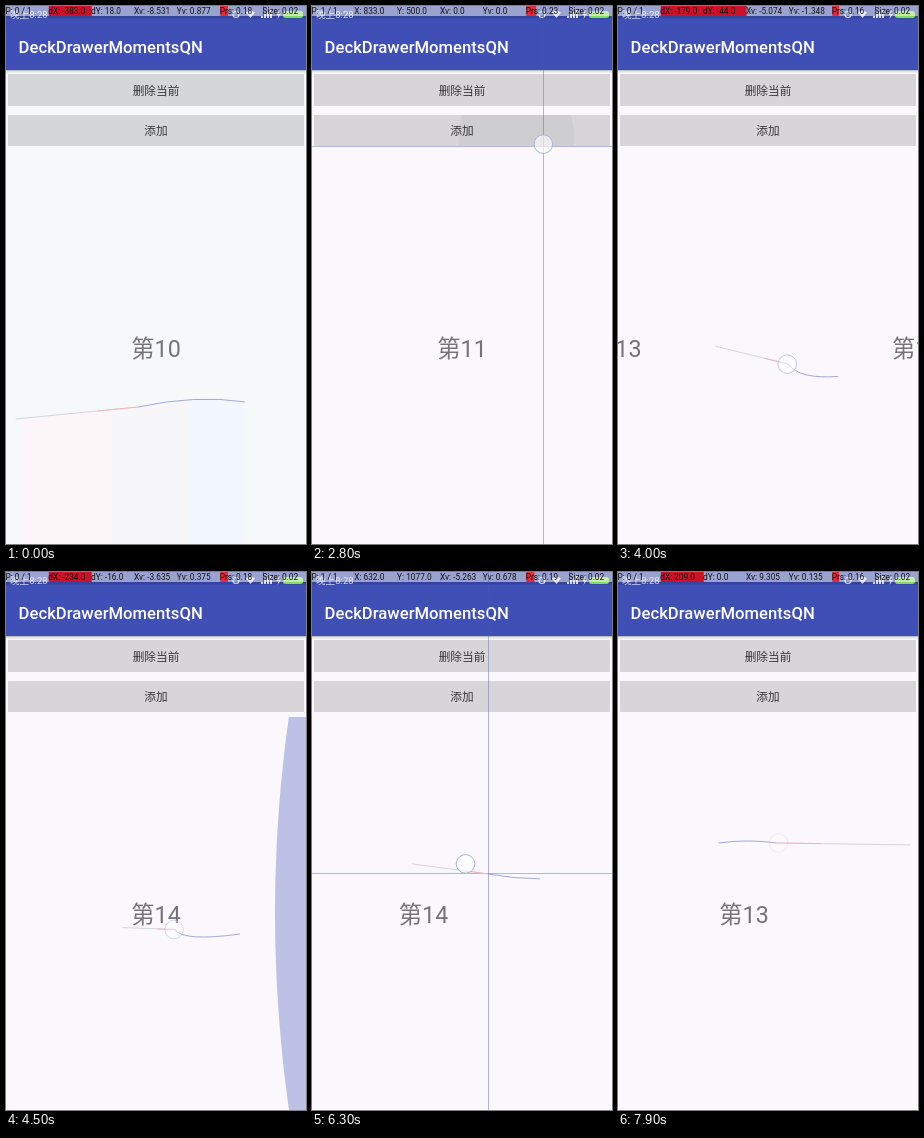
These frames come from a looping animation (300 by 538 pixels, 8000 ms). An HTML page:

```html
<!DOCTYPE html>
<html lang="zh">
<head>
<meta charset="utf-8">
<title>Pager demo</title>
<style>
html, body { margin: 0; width: 300px; height: 538px; overflow: hidden; background: #faf8fc; }
svg { display: block; }
text { font-family: Roboto, "Noto Sans CJK SC", "Noto Sans CJK", sans-serif; }
.label { font-size: 11.67px; fill: #363638; text-anchor: middle; }
.page { font-size: 23.3px; fill: #747376; text-anchor: middle; }
.cell { font-size: 8.3px; fill: #111; }
.line { fill: none; stroke-width: .9; }
#buttons { filter: drop-shadow(0 .7px .7px rgba(0, 0, 0, .22)); }
</style>
</head>
<body>
<svg width="300" height="538" viewBox="0 0 300 538">
  <defs>
    <clipPath id="body"><rect y="145" width="300" height="393"/></clipPath>
    <clipPath id="addBox"><rect x="2" y="109" width="296" height="31" rx="1.5"/></clipPath>
  </defs>
  <rect id="bg" width="300" height="538"/>
  <g id="wash">
    <path d="M16 413L105 403V538H16Z" fill="#fcf6f8"/>
    <path d="M105 403L183 394V538H105Z" fill="#f7f6f9"/>
    <path d="M183 394L239 396V538H183Z" fill="#f3f8fe"/>
  </g>

  <rect width="300" height="64" fill="#3f4fb5"/>
  <rect width="300" height="12.5" fill="#35449f"/>
  <rect y="64" width="300" height="1" fill="#bdbdc6"/>
  <rect y="65" width="300" height="1.5" fill="#e4e3e9"/>
  <text x="12.6" y="47" font-size="16.67" font-weight="500" fill="#fff">DeckDrawerMomentsQN</text>

  <g id="buttons">
    <rect x="2" y="68" width="296" height="32" rx="1.5"/>
    <rect x="2" y="109" width="296" height="31" rx="1.5"/>
  </g>
  <g clip-path="url(#addBox)"><circle id="ripple" fill="#cecdd0"/></g>
  <text class="label" x="150" y="88.7">删除当前</text>
  <text class="label" x="150" y="129.2">添加</text>

  <text class="page" id="pageA" y="350.7"></text>
  <text class="page" id="pageB" y="350.7"></text>
  <g clip-path="url(#body)"><circle id="glow" cy="341" r="1393" fill="#3f51b5" fill-opacity=".33"/></g>

  <g fill="#fff" opacity=".8">
    <text x="4" y="12" font-size="9.6">晚上8:28</text>
    <circle cx="230" cy="8.5" r="3" fill="none" stroke="#fff" stroke-width="1.2"/>
    <path d="M240 6.5Q244.500 3 249 6.500L244.500 12Z"/>
    <path d="M255 12v-2h2v2zM258 12v-4h2v4zM261 12v-6h2v6zM264 12v-8h2v8z"/>
    <path d="M273.500 4L270.500 9H272.500L271.500 13L275 8H273Z"/>
  </g>
  <rect x="277" y="5" width="20" height="7" rx="2.5" fill="#84dc5c"/>
  <g id="cells"></g>

  <path class="line" id="cross" stroke="#3f5bb4" stroke-opacity=".45"/>
  <path class="line" id="speed" stroke="#d3d0d6"/>
  <path class="line" id="trail" stroke="#9a9cda"/>
  <path class="line" id="guess" stroke="#f0b4bc"/>
  <circle id="touch" r="9.3" fill="#fff" fill-opacity=".62" stroke="#aab5d4" stroke-width="1"/>
</svg>
<script>
const LOOP = 8000, STEP = 100, SETTLE = 350;
const SX = 300 / 1080, SY = 538 / 1920, CELL = 300 / 7;
const $ = id => document.getElementById(id);
const clamp = (v, lo = 0, hi = 1) => Math.min(hi, Math.max(lo, v));
const set = (id, attrs) => {
  for (const k in attrs) $(id).setAttribute(k, attrs[k]);
};
const show = (id, on) => set(id, { visibility: on ? 'visible' : 'hidden' });

// Touch positions are in device pixels; bend and vy are in stage pixels.
const swipe = (up, turn, x, y, dx, dy, xv, yv, vy, bend, prs = 0.18) =>
  ({ down: up - 150, up, turn, x, y, dx, dy, xv, yv, vy, bend, prs });
const tap = (down, up, x, y, prs) =>
  ({ down, up, turn: 0, x, y, dx: 0, dy: 0, xv: 0, yv: 0, vy: 0, prs, tap: true });

const touches = [
  swipe(-500, 0, 860, 1413, -383, 18, -8.531, 0.877, 12, [4, -10]),
  swipe(1030, 1, 850, 1380, -240, -12, -5.42, -0.412, -6, [-4, 5]),
  tap(1540, 1690, 763, 455, 0.18),
  tap(1950, 2080, 790, 470, 0.21),
  tap(2350, 2470, 815, 488, 0.2),
  tap(2730, 2850, 833, 500, 0.23),
  swipe(3040, 1, 806, 1290, -210, -30, -4.812, -0.906, -13, [-10, 6]),
  swipe(3500, 1, 798, 1310, -195, -36, -4.655, -1.104, -15, [-12, 8], 0.16),
  swipe(3962, 1, 792, 1322, -179, -44, -5.074, -1.348, -18, [-14, 9], 0.16),
  swipe(4420, 0, 842, 1292, -234, -16, -3.635, 0.375, -2, [-24, 10]),
  tap(5880, 5970, 800, 470, 0.19),
  swipe(6330, 1, 821, 1095, -236, -22, -5.263, 0.678, -10, [0, 3], 0.19),
  swipe(7230, -1, 350, 980, 225, 4, 8.74, 0.182, 3, [0, -4]),
  swipe(7768, -1, 362, 967, 209, 0, 9.305, 0.135, 2, [0, -4], 0.16)
];

const cells = Array.from({ length: 7 }, (_, i) => {
  const add = (tag, attrs) => {
    const el = document.createElementNS('http://www.w3.org/2000/svg', tag);
    for (const k in attrs) el.setAttribute(k, attrs[k]);
    return $('cells').appendChild(el);
  };
  const box = { x: i * CELL, y: 0, height: 10 };
  return {
    back: add('rect', { ...box, width: CELL, fill: '#fff', 'fill-opacity': .5 }),
    level: add('rect', { ...box, width: 0, fill: '#f00', 'fill-opacity': .75 }),
    text: add('text', { class: 'cell', x: i * CELL - .6, y: 8 })
  };
});

function pagePos(t) {
  let pos = 10;
  for (const s of touches) {
    if (!s.turn || t < s.down) continue;
    const pulled = clamp((t - s.down) / (s.up - s.down)) * Math.abs(s.dx) * SX;
    const drag = Math.max(0, pulled - 14) / 300;
    const ease = 1 - (1 - clamp((t - s.up) / SETTLE)) ** 5;
    pos += s.turn * (drag + (1 - drag) * ease);
  }
  return pos;
}

function drawPages(t, touch) {
  const pos = pagePos(t), n = Math.floor(pos + 1e-6);
  const blank = touch.tap && t > touch.up && t - touch.up <= STEP;
  ['pageA', 'pageB'].forEach((id, i) => {
    $(id).textContent = '第' + (n + i);
    set(id, { x: 150 + (n + i - pos) * 300 });
    show(id, !blank);
  });
}

function drawBar(s, held, px, py) {
  const speed = v => v ? v.toFixed(3) : '0.0';
  const texts = [
    `P: ${held ? 1 : 0} / 1`,
    held ? `X: ${px.toFixed(0)}.0` : `dX: ${s.dx.toFixed(1)}`,
    held ? `Y: ${py.toFixed(0)}.0` : `dY: ${s.dy.toFixed(1)}`,
    `Xv: ${speed(s.xv)}`, `Yv: ${speed(s.yv)}`,
    `Prs: ${s.prs.toFixed(2)}`, 'Size: 0.02'
  ];
  const moved = d => !held && Math.abs(d) > 24 ? 1 : 0;
  const levels = [0, moved(s.dx), moved(s.dy), 0, 0, s.prs, .02];
  cells.forEach((c, i) => {
    c.text.textContent = texts[i];
    c.level.setAttribute('width', levels[i] * CELL);
    c.back.setAttribute('visibility', levels[i] === 1 ? 'hidden' : 'visible');
  });
}

function drawTouch(t, s) {
  const held = t < s.up;
  const p = clamp((t - s.down) / (s.up - s.down));
  const px = s.x + s.dx * p, py = s.y + s.dy * p;
  const x0 = s.x * SX, y0 = s.y * SY, x = px * SX, y = py * SY;
  drawBar(s, held, px, py);

  show('cross', held);
  set('cross', { d: `M${Math.round(x) + .5} 0V538M0 ${Math.floor(y) + .5}H300` });

  for (const id of ['speed', 'trail', 'guess']) show(id, !s.tap);
  if (!s.tap) {
    const cx = (x0 + x) / 2 + s.bend[0] * p, cy = (y0 + y) / 2 + s.bend[1] * p;
    const ahead = k => `M${x} ${y}L${x + s.xv * 14.4 * k} ${y + s.vy * k}`;
    set('trail', { d: `M${x0} ${y0}Q${cx} ${cy} ${x} ${y}` });
    set('speed', { d: ahead(1) });
    set('guess', { d: ahead(.33) });
  }

  // The touch dot runs slightly ahead of the crosshair.
  const lead = held ? [s.xv * 4.2, s.vy * .8 - 2] : [s.xv * .2, 0];
  set('touch', {
    cx: x + lead[0], cy: y + lead[1],
    opacity: held ? 1 : clamp(1 - (t - s.up) / 160)
  });

  const age = t - s.down;
  show('ripple', s.tap && held);
  set('ripple', { cx: x + (150 - x) * clamp(age / 210), cy: 130, r: 30 + age * .4 });
}

function draw(t) {
  const touch = touches.filter(s => s.down <= t).pop();
  const cool = t < 900;
  set('bg', { fill: cool ? '#f6f9fa' : '#faf8fc' });
  set('buttons', { fill: cool ? '#d4d7d7' : '#d7d5d8' });
  show('wash', cool);
  drawPages(t, touch);
  drawTouch(t, touch);
  const depth = 31 * (t < 4500 ? clamp((t - 4300) / 200) : clamp((5000 - t) / 500));
  show('glow', depth > 0);
  set('glow', { cx: 300 - depth + 1393 });
}

const start = performance.now();
function tick() {
  const t = (performance.now() - start) % LOOP;
  draw(Math.floor(t / STEP) * STEP);
  requestAnimationFrame(tick);
}
tick();
</script>
</body>
</html>
```
